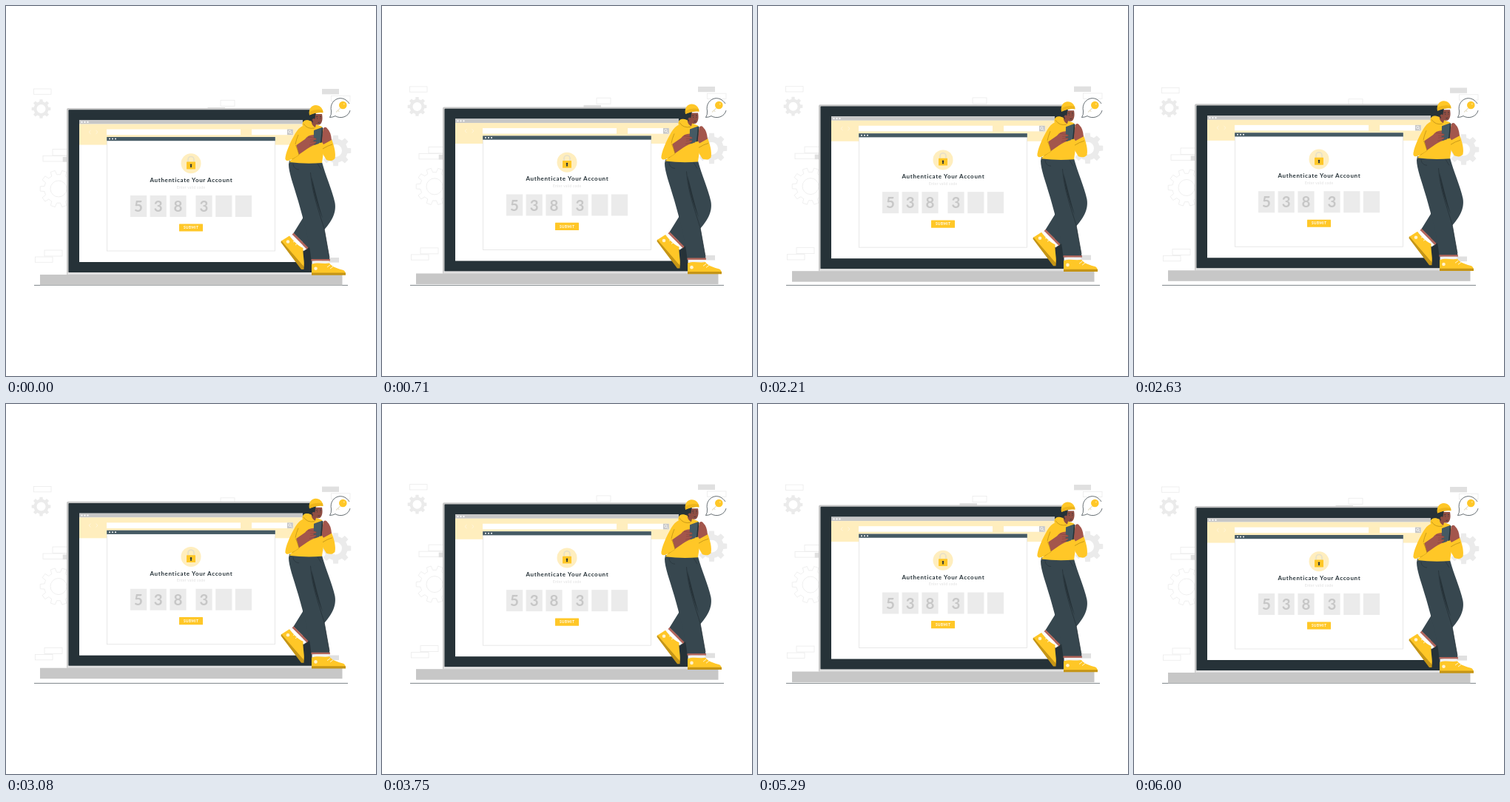
An HTML page for the animation above (6040 ms loop, 500 by 500 pixels).

```html
<!DOCTYPE html>
<html lang="en">
<head>
<meta charset="utf-8">
<title>Authenticate Your Account</title>
<style>
  html, body { margin: 0; width: 100%; height: 100%; overflow: hidden; background: #fff; }
  svg { display: block; width: 100vw; height: 100vh; }
  text { font-family: Lato, sans-serif; font-weight: 700; text-anchor: middle; }
</style>
</head>
<body>
<svg viewBox="0 0 500 500">
  <g id="backdrop"></g>
  <path d="M38 377.4H462" stroke="#263238" stroke-width=".6"/>

  <g id="floating">
    <g id="laptop">
      <path d="M82 363V140q0-2 2-2H416q2 0 2 2V363Z" fill="#c7c7c7"/>
      <rect x="84.5" y="140.3" width="331" height="220" rx="1" fill="#263238"/>
      <rect x="83" y="360" width="334" height="3" fill="#e0e0e0"/>
      <rect x="46" y="363" width="408.5" height="14.5" fill="#c7c7c7"/>
      <rect x="99" y="154" width="302" height="192" fill="#fff"/>
      <rect x="99" y="154" width="302" height="5.6" fill="#c7c7c7"/>
      <rect x="99" y="159.6" width="302" height="28" fill="#ffeebe"/>
      <g fill="#fff">
        <circle cx="102.5" cy="156.9" r="1.1"/><circle cx="106.5" cy="156.9" r="1.1"/><circle cx="110.5" cy="156.9" r="1.1"/>
        <rect x="136" y="166.6" width="181" height="7.6"/>
        <rect x="332" y="166.6" width="56" height="7.6"/>
      </g>
      <path d="M114.5 168l-2.5 2.4 2.5 2.4M121.5 168l2.5 2.4-2.5 2.4" fill="none" stroke="#fff7df" stroke-width=".9"/>
      <rect x="380" y="166.6" width="7.8" height="7.6" fill="#c7c7c7"/>
      <path d="M384.6 171.2l1.8 1.8" stroke="#fff" stroke-width=".9"/>
      <circle cx="383.4" cy="169.9" r="1.7" fill="none" stroke="#fff" stroke-width=".8"/>
    </g>

    <g id="dialog">
      <rect x="136.5" y="177.5" width="227" height="153.5" fill="#fff" stroke="#e3e3e3" stroke-width=".8"/>
      <rect x="136.2" y="177" width="227.6" height="5.2" fill="#455a64"/>
      <g fill="#fff">
        <circle cx="140" cy="179.6" r="1"/><circle cx="144" cy="179.6" r="1"/><circle cx="148" cy="179.6" r="1"/>
      </g>
      <circle cx="250" cy="212.7" r="13.5" fill="#ffeebe"/>
      <path d="M246 211v-3.5a4 4 0 0 1 8 0V211" fill="none" stroke="#e6dfc9" stroke-width="1.6"/>
      <rect x="244" y="210.6" width="12" height="9.8" rx=".6" fill="#ffc727"/>
      <path d="M250 213.4a1.3 1.3 0 0 1 .7 2.4l.4 2.2h-2.2l.4-2.2a1.3 1.3 0 0 1 .7-2.4Z" fill="#263238"/>
      <text x="250.4" y="238" font-size="8" letter-spacing=".66" fill="#263238">Authenticate Your Account</text>
      <text x="250.2" y="246.6" font-size="4.8" letter-spacing=".3" fill="#dedede" style="font-weight:400">Enter valid code</text>
      <g id="digits"></g>
      <rect x="234" y="294.4" width="32" height="10.2" rx=".5" fill="#ffc727"/>
      <text x="250.2" y="301.1" font-size="4.6" letter-spacing=".5" fill="#fff">SUBMIT</text>
    </g>

    <g id="person">
      <!-- crossed leg and its shoe -->
      <path d="M405 211H427C432 230 441 249 444.5 266C447 281 438 293 432 300L409 327L388.5 307L404 282Z" fill="#37474f"/>
      <path d="M388.5 306.5L408.5 326.5L406.5 329L386.5 309Z" fill="#b2655b"/>
      <path d="M387 309.3L406 328.4L402 331L384 312Z" fill="#fff" stroke="#e0e0e0" stroke-width=".4"/>
      <path d="M372 317.5L383 310.5C388 317 393 323 401.5 327C401 335 403 343 403 351L400 355.5Z" fill="#ffc727"/>
      <path d="M372 317L401.5 351L403 347.5L402.5 356H399L371.5 319.5Z" fill="#c59516"/>
      <circle cx="381" cy="318.5" r="2.3" fill="#fff3cf"/>
      <path d="M388 319l5-3M391 323l5-3" stroke="#fff" stroke-width=".8"/>
      <!-- standing leg and its shoe -->
      <path d="M383 209H426L412 232C417 258 427 285 431 306L437.5 343H412.5C410 318 403 292 395 264C388 240 382 225 382 214Z" fill="#37474f"/>
      <path d="M411.5 225C413 252 424 281 430 301L437 340" fill="none" stroke="#263238" stroke-width=".8"/>
      <path d="M413 231C414 252 423 275 428 287C421 264 417 245 413 231Z" fill="#263238"/>
      <path d="M388 213c0 5 4 8 8 8M421 213l5 8" fill="none" stroke="#263238" stroke-width=".6"/>
      <rect x="412.5" y="342" width="25.3" height="2.6" fill="#b2655b"/>
      <rect x="413.5" y="344.5" width="23" height="4.5" fill="#f2f2f2"/>
      <path d="M413 349C421 346 429 349 437 347.5C441 353 449 355 456 357Q459 359 459 362.5H413Z" fill="#ffc727"/>
      <path d="M413 360.6H459V363.8H413Z" fill="#c59516"/>
      <circle cx="418.5" cy="354.7" r="2.3" fill="#fff3cf"/>
      <path d="M434 353l4-3M438 355l4-3" stroke="#fff" stroke-width=".8"/>
      <!-- hoodie -->
      <path d="M401 158C405 153 411 154 414 158L427 163C432 174 430 193 427 212Q405 214 383 211L386 207Q380 211 377.5 207C377 200 384 184 391 172Q396 164 401 162Z" fill="#ffc727"/>
      <path d="M400.5 161C400 154 406 152.5 413 156L416 165Q407 169 400.5 161Z" fill="#ffc727"/>
      <path d="M402 159Q407 167 417 165M395 174Q392 181 391 187M387 207L396 201" fill="none" stroke="#a67c10" stroke-width=".6"/>
      <!-- head -->
      <path d="M411 146H427C428 151 428 157 424.5 160Q421 161 419 160L418 164Q414 162 413 158Z" fill="#8f4e43"/>
      <path d="M410.5 146L419 144Q418 148 417.3 153Q415 151 414.5 154L415 158Q411 154 410.5 146Z" fill="#263238"/>
      <circle cx="415.5" cy="154" r="1.7" fill="#8f4e43"/>
      <path d="M418.8 149.8l2.6-.4M424 149.4l2 .3M420 152h1.2M424.4 152h1M421.5 157.3q1.5.5 2.6-.4" fill="none" stroke="#263238" stroke-width=".7"/>
      <path d="M410 147.5C408.5 139 413 134 418.5 134C424 134 428 138 428.5 143.5Q419 143 410 147.5Z" fill="#ffc727"/>
      <path d="M410 147.5L409.8 143Q418 138.5 428 140.6L428.5 144.2Q419 143 410 147.5Z" fill="#eeb51b"/>
      <!-- arms and phone -->
      <path d="M428 187L440 180C443 188 446 198 444.5 206Q441 211 433 208Q428 201 426 194Z" fill="#ffc727"/>
      <path d="M428 193Q434 189 441 187" fill="none" stroke="#a67c10" stroke-width=".6"/>
      <path d="M429 165Q432 162 434.5 166Q439 170 440 181L429 187L425 181Q428 173 429 165Z" fill="#a3564c"/>
      <path d="M391 189L404 180Q408 174 416 174L422 178L423 186Q414 188 407 193L394 202Z" fill="#a3564c"/>
      <path d="M416 168L427 164Q428.5 164 428.2 166L426.5 184L418 187.5Q415.5 188 415.6 185Z" fill="#455a64"/>
      <path d="M427 164.2L428.4 165L426.6 184.5L425 185Z" fill="#263238"/>
      <path d="M408 177L418 178.5Q421 180 418 181L411 181M411 184L419 183Q420 185 417 186L410 188" fill="#a3564c" stroke="#7d4039" stroke-width=".5"/>
      <path d="M388 189L392 187L396 201Q388 207 379 209Q377 207 378 204Z" fill="#ffc727"/>
      <path d="M391.5 188Q394 194 396 201" fill="none" stroke="#a67c10" stroke-width=".6"/>
    </g>
  </g>

  <g id="bubble">
    <path d="M464 132C460 126 455 124.5 451 124.7C443 125.5 437.5 133 439.5 142Q440 147 437.5 150.5Q442 150.3 445 148.6C452 153 463 150 465 141" fill="#fff" stroke="#263238" stroke-width=".7"/>
    <path d="M464 132Q466.5 136 465 141L450 146V130Z" fill="#fff"/>
    <path d="M451.8 137.8L446 143.5M448.5 141l1.8 1.8" stroke="#e6dfc9" stroke-width="1.1"/>
    <circle cx="455.3" cy="134" r="5.3" fill="#ffc727"/>
    <circle cx="456.8" cy="132.6" r="1" fill="#ffe08a"/>
  </g>
</svg>
<script>
const LOOP = 6040, TURN = 2980, LIFT = 6.5;
const GRAY = '#ebebeb';
const byId = id => document.getElementById(id);

function gear(cx, cy, radius, hole, teeth, filled) {
  const step = 2 * Math.PI / teeth;
  const point = (r, a) => `${(cx + r * Math.cos(a)).toFixed(2)} ${(cy + r * Math.sin(a)).toFixed(2)}`;
  const root = radius * 0.77;
  let d = '';
  for (let i = 0; i < teeth; i++) {
    const a = i * step;
    d += `${i ? 'L' : 'M'}${point(root, a - step * .3)}L${point(radius, a - step * .2)}` +
         `L${point(radius, a + step * .2)}L${point(root, a + step * .3)}` +
         `A${root} ${root} 0 0 1 ${point(root, a + step * .7)}`;
  }
  d += `ZM${cx - hole} ${cy}a${hole} ${hole} 0 1 0 ${2 * hole} 0a${hole} ${hole} 0 1 0 ${-2 * hole} 0Z`;
  const paint = filled ? `fill="${GRAY}"` : `fill="none" stroke="${GRAY}" stroke-width=".8"`;
  return `<path d="${d}" fill-rule="evenodd" ${paint}/>`;
}

const block = (x, y, w, h, fill) =>
  `<rect x="${x}" y="${y}" width="${w}" height="${h}" fill="${fill || 'none'}"` +
  (fill ? '/>' : ` stroke="${GRAY}" stroke-width=".8"/>`);

byId('backdrop').innerHTML =
  gear(47.5, 139, 13, 6, 8, true) + gear(71, 247, 25, 11, 10, false) + gear(445.5, 195.5, 21, 8.5, 8, true) +
  block(37.5, 112, 23.5, 7.3) + block(63, 193.5, 24, 8.5) + block(50, 202.5, 32, 7.5) +
  block(76.7, 204, 8, 6.6, '#e0e0e0') + block(52, 330, 24, 8) + block(39.5, 339, 23.5, 7.3) +
  block(290, 127.3, 19, 8) + block(272.5, 137, 23.5, 7, '#e0e0e0') +
  block(427, 112, 23, 7.3, '#e0e0e0') + block(439.5, 121.3, 25.5, 7.3) +
  block(427, 340, 23, 6.6, '#e0e0e0');

byId('digits').innerHTML = [168, 194.6, 221.4, 256.4, 283.2, 309.8].map((x, i) =>
  block(x, 256, 22.2, 29, GRAY) +
  `<text x="${x + 11}" y="278.2" font-size="20.5" fill="#c7c7c7">${'5383'[i] || ''}</text>`).join('');

// Triangle wave: 0 at the start, 1 after `half` ms, back to 0 after twice that.
function wave(t, half) {
  const phase = t / half % 2;
  return phase < 1 ? phase : 2 - phase;
}

function draw(t) {
  const time = Math.min(t % LOOP, 2 * TURN);
  const shift = (id, amount) => byId(id).setAttribute('transform', `translate(0 ${-LIFT * amount})`);
  shift('floating', wave(time, TURN));
  shift('backdrop', wave(time, TURN / 2));
}

const start = performance.now();
function tick() {
  draw(performance.now() - start);
  requestAnimationFrame(tick);
}
tick();
</script>
</body>
</html>
```
